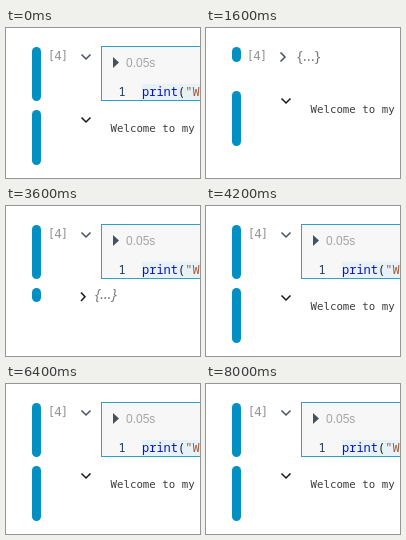
An HTML page that plays this animation: 194x150 px, repeating every 8.8 s.

```html
<!DOCTYPE html>
<html lang="en">
<head>
<meta charset="utf-8">
<title>Folding notebook cells</title>
<style>
  html, body { margin: 0; width: 100%; height: 100%; overflow: hidden; background: #fff; }
  svg { display: block; width: 194px; height: 150px; }
  .bar { fill: #0290c2; }
  .chevron { fill: none; stroke-width: 1.5; }
  .input { stroke: #45525e; }
  .output { stroke: #161616; }
  .sans { font: 12px "Liberation Sans", Arial, sans-serif; fill: #a4a4a4; }
  .count { font: 12px "DejaVu Sans", sans-serif; fill: #929292; }
  .folded { font: 15px "Open Sans", sans-serif; fill: #777; }
  .italic { font-style: italic; }
  .code { font: 12px "Noto Sans Mono", monospace; white-space: pre; }
  .printed { font: 10.75px "DejaVu Sans Mono", monospace; fill: #3c3c3c; }
</style>
</head>
<body>
<svg viewBox="0 0 194 150">
  <rect id="inputBar" class="bar" x="26" y="19" width="9" rx="4.5"/>
  <text class="count" id="count" y="32">[4]</text>

  <g id="inputOpen">
    <path class="chevron input" d="M75.5 26.5l4.5 4.5l4.5-4.5"/>
    <rect x="95.5" y="18.5" width="110" height="54" fill="#f7f7f7" stroke="#2ba3c4"/>
    <path d="M107 29v11l6-5.5z" fill="#46515c"/>
    <text class="sans" x="120" y="38.5">0.05s</text>
    <rect x="136" y="56" width="58" height="16" fill="#e6f1f8"/>
    <text class="code" x="112.5" y="68" fill="#1f3352">1</text>
    <text class="code" x="136" y="68"><tspan fill="#0a12c0">print</tspan><tspan fill="#222">(</tspan><tspan fill="#a5512c">"W</tspan></text>
  </g>
  <g id="inputFolded">
    <path class="chevron input" d="M74.5 24.5l4.5 4.5l-4.5 4.5"/>
    <text class="folded" x="91" y="33">{...}</text>
  </g>

  <g id="output">
    <rect id="outputBar" class="bar" x="26" y="82" width="9" rx="4.5"/>
    <g id="outputOpen">
      <path class="chevron output" d="M75.5 89.5l4.5 4.5l4.5-4.5"/>
      <text class="printed" x="104.5" y="104">Welcome to my</text>
    </g>
    <g id="outputFolded">
      <path class="chevron output" d="M75 86.5l4 4.25l-4 4.25"/>
      <text class="folded italic" x="89" y="93">{...}</text>
    </g>
  </g>
</svg>
<script>
  const LOOP = 8800;
  const inputFolds = [[1200, 2000], [7200, 8000]];
  const outputFolds = [[3600, 4200], [5200, 6400]];
  const get = id => document.getElementById(id);
  const within = (spans, time) => spans.some(([start, end]) => time >= start && time < end);
  const show = (id, visible) => get(id).setAttribute("display", visible ? "inline" : "none");

  function draw() {
    const time = performance.now() % LOOP;
    const inputFolded = within(inputFolds, time);
    const outputFolded = within(outputFolds, time);
    show("inputOpen", !inputFolded);
    show("inputFolded", inputFolded);
    show("outputOpen", !outputFolded);
    show("outputFolded", outputFolded);
    get("count").setAttribute("x", inputFolded ? 42.5 : 43.5);
    get("inputBar").setAttribute("height", inputFolded ? 15 : 54);
    get("outputBar").setAttribute("height", outputFolded ? 14 : 55);
    get("output").setAttribute("transform", `translate(0 ${inputFolded ? -19 : 0})`);
    requestAnimationFrame(draw);
  }
  draw();
</script>
</body>
</html>
```
